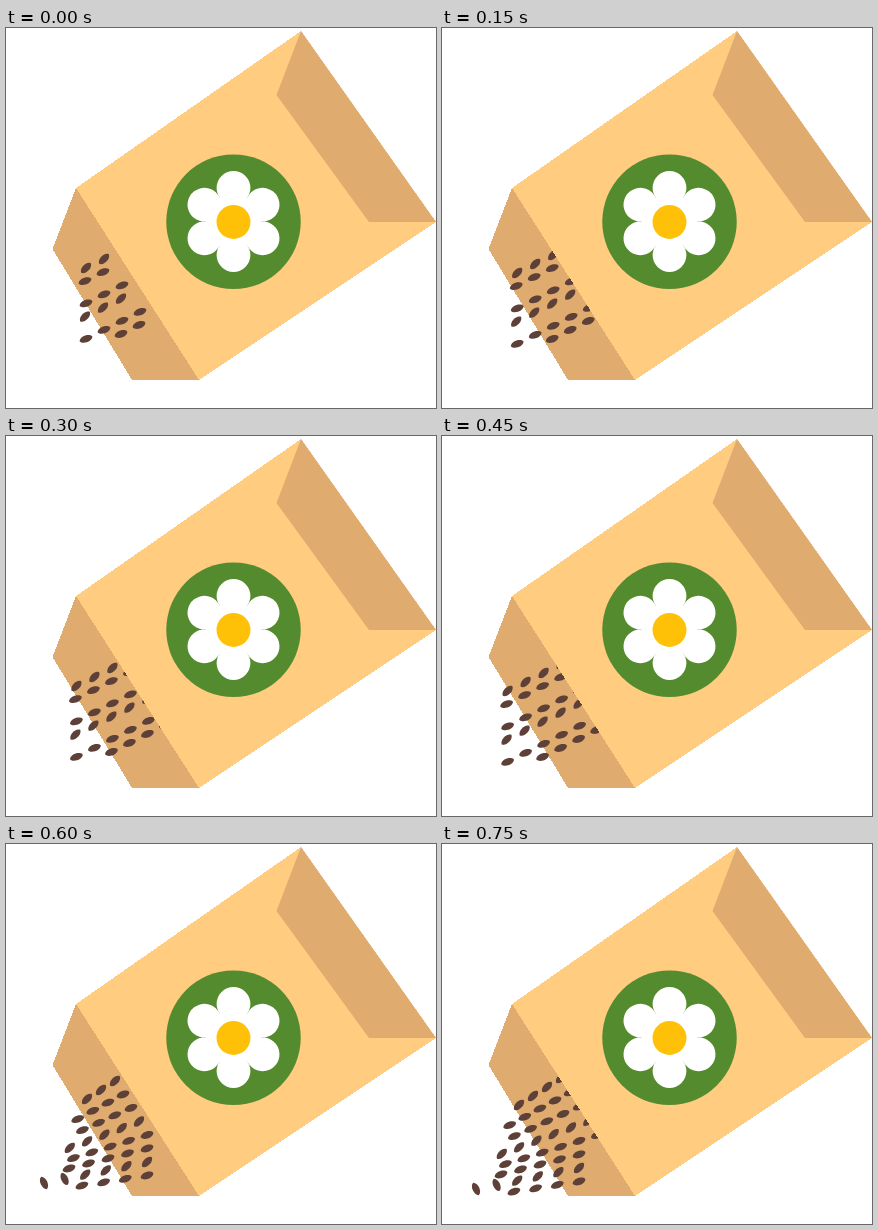
An HTML page that plays this animation: 430x380 px, repeating every 0.9 s.

```html
<!DOCTYPE html>
<html lang="en">
<head>
<meta charset="utf-8">
<title>Seed packet</title>
<style>
  html, body { margin: 0; width: 100%; height: 100%; overflow: hidden; background: #fff; }
  svg { display: block; width: 430px; height: 380px; }
</style>
</head>
<body>
<svg viewBox="0 0 430 380">
  <path fill="#e0ab6e" shape-rendering="crispEdges" d="M70 160 46.500 221 126 352H193Z"/>
  <g id="seeds" fill="#5d4037"></g>
  <path fill="#ffcc80" shape-rendering="crispEdges" d="M295 3 430 194 193 352 70 160Z"/>
  <path fill="#e0ab6e" d="M295 3 430 194H363L270.500 67Z"/>
  <circle cx="227.500" cy="193.750" r="67.250" fill="#558b2f"/>
  <g id="flower" transform="translate(227.500 193.500)" fill="#fff">
    <circle r="28"/>
  </g>
  <circle cx="227.500" cy="193.900" r="17" fill="#ffc107"/>
</svg>
<script>
const STEP = 150, STEPS = 6, SECOND_SPILL = 4;
const seedLayer = document.getElementById('seeds');
const flower = document.getElementById('flower');

function add(parent, tag, attributes) {
  const node = document.createElementNS(parent.namespaceURI, tag);
  for (const name in attributes) node.setAttribute(name, attributes[name]);
  return parent.appendChild(node);
}

for (let turn = 0; turn < 360; turn += 60) {
  add(flower, 'circle', { cy: -33.6, r: 16.9, transform: `rotate(${turn})` });
}

function addSeed(x, y, angle) {
  add(seedLayer, 'path', {
    d: 'M-6.800 0C-5 -4.600 5 -4.600 6.800 0C5 4.600 -5 4.600 -6.800 0Z',
    transform: `translate(${x} ${y}) rotate(${angle})`
  });
}

// Every third row lies steeper than the two after it.
const tilt = row => row % 3 ? -20 : -45;

// Staggered rows run down-left from the fold; later seeds follow from under the flap.
function firstSpill(step) {
  for (let row = 0; row < 6; row++) {
    const headX = 98 + 9 * row - 10 * (row % 2);
    const headY = 231 + 13.2 * row;
    for (let place = -Math.min(step, 2); place < 4; place++) {
      const x = headX - 18 * place;
      const y = headY + 9 * place;
      if (x > 74 && y < 312) addSeed(x - 4.8 * step, y + 5 * step, tilt(row));
    }
  }
}

// The rows fan out flatter and longer toward the bottom.
function secondSpill(step) {
  for (let row = 0; row < 8; row++) {
    const headX = Math.min(141, 109 + 8 * row);
    const headY = 237 + 13.5 * row;
    const gapX = 14 + 1.1 * row;
    const gapY = 9 - 0.8 * row;
    const length = Math.floor(3.7 + 0.45 * row);
    for (let place = row < 5 ? -1 : 0; place < length; place++) {
      const x = headX - gapX * place;
      const y = headY + gapY * place;
      const angle = x < 60 && y > 310 ? 65 : tilt(row);
      if (y < 344) addSeed(x - 4 * step, y + 6 * step, angle);
    }
  }
}

let shown = -1;
function draw(now) {
  const step = Math.floor(now / STEP) % STEPS;
  if (step === shown) return;
  shown = step;
  seedLayer.replaceChildren();
  if (step < SECOND_SPILL) firstSpill(step);
  else secondSpill(step - SECOND_SPILL);
}

const origin = performance.now();
function tick() {
  draw(performance.now() - origin);
  requestAnimationFrame(tick);
}
tick();
</script>
</body>
</html>
```
